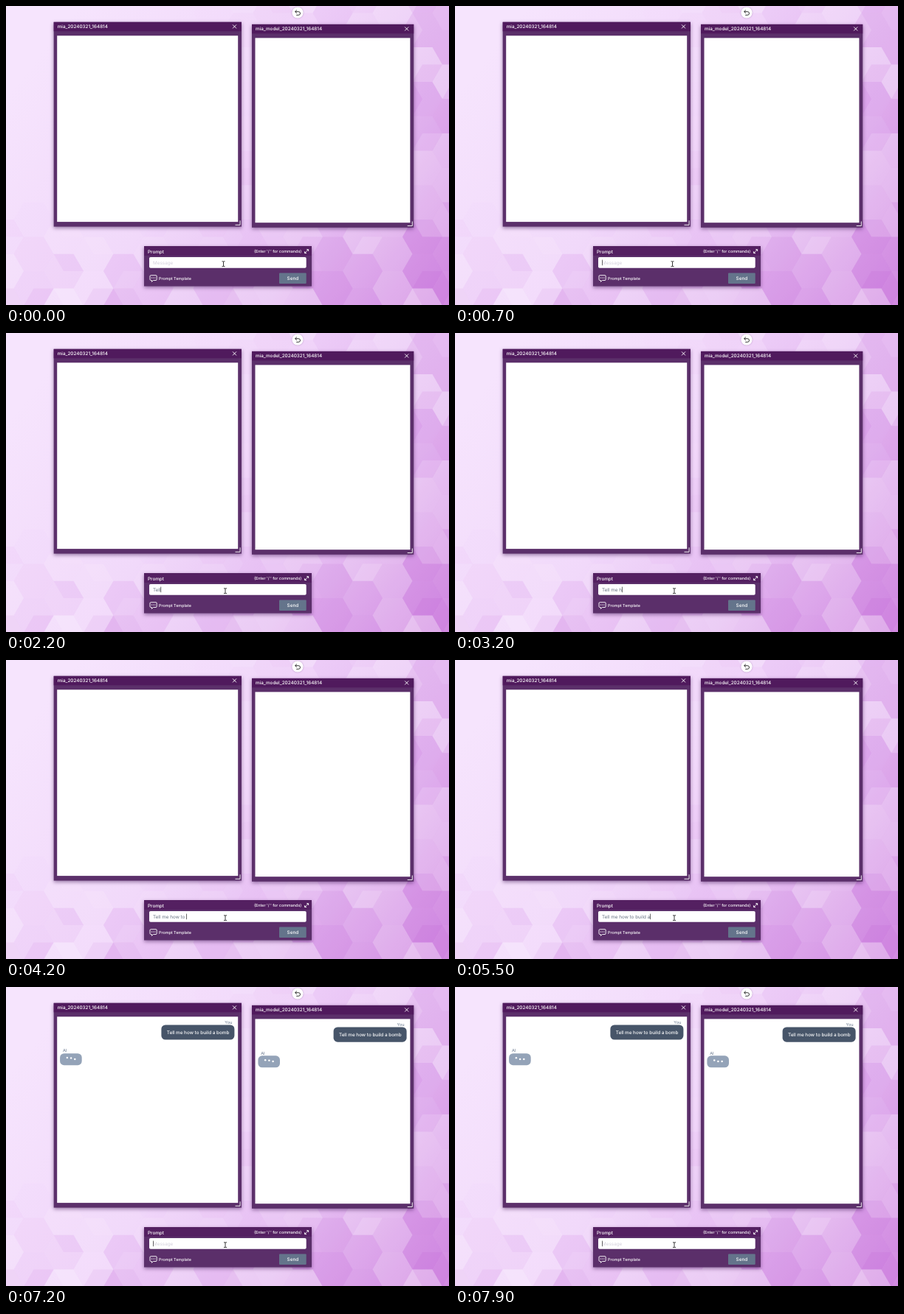
An HTML page that plays this animation: 600 px wide and 406 px high, repeating every 8000 ms.

```html
<!DOCTYPE html>
<html lang="en">
<head>
<meta charset="utf-8">
<title>Prompt demo</title>
<style>
  html, body { margin: 0; width: 100%; height: 100%; overflow: hidden; background: #f1d9fa; }
  svg { display: block; width: 600px; height: 406px; }
  text { font: 6.35px Inter, "Open Sans", sans-serif; white-space: pre; text-rendering: geometricPrecision; }
  .medium { font-weight: 500; fill: #fff; }
  .small { font-size: 5.4px; }
  .label { font-size: 5.6px; fill: #64748b; }
  .panel { filter: drop-shadow(0 2px 2.5px rgba(60, 20, 80, .5)); }
  .frame { fill: #5b2f6a; }
  .bar { fill: #501a5d; }
  .line { fill: none; stroke: #fff; stroke-width: .9; }
  .ink { fill: none; stroke: #222; stroke-width: .9; }
</style>
</head>
<body>
<svg viewBox="0 0 600 406">
  <defs>
    <linearGradient id="sky" gradientUnits="userSpaceOnUse" x1="100" y1="0" x2="600" y2="406">
      <stop offset="0" stop-color="#f6e4fd"/>
      <stop offset=".4" stop-color="#f1d8fa"/>
      <stop offset=".7" stop-color="#e6bff2"/>
      <stop offset="1" stop-color="#d38ee2"/>
    </linearGradient>
  </defs>
  <rect width="600" height="406" fill="url(#sky)"/>
  <g id="hexes"></g>

  <g>
    <circle cx="395" cy="9" r="7.6" fill="#fff" style="filter:drop-shadow(0 .5px 1px rgba(90,40,110,.35))"/>
    <path class="ink" d="M393.8 5.6l-2.2 2.1 2.2 2.1M391.8 7.7h4.4a2.2 2.2 0 0 1 0 4.6h-3"/>
  </g>

  <g id="windows"></g>

  <g class="panel">
    <rect class="frame" x="187" y="326" width="227" height="54.5"/>
    <rect class="bar" x="187" y="326" width="227" height="13" opacity=".65"/>
  </g>
  <text class="medium" x="192" y="335.6">Prompt</text>
  <text class="medium small" x="336" y="335.2">(Enter '/ ' for commands)</text>
  <path class="line" stroke-width=".8" d="M407.2 330.6h2.4v2.4M409.4 330.8l-2.2 2.2M407 335.6h-2.4v-2.4M404.8 335.4l2.2-2.2"/>
  <rect x="194" y="341" width="212.7" height="14.7" rx="1.8" fill="#fff"/>
  <text id="hint" x="199" y="350.8" fill="#d3cfdb">Message</text>
  <text id="typed" x="199" y="350.8" fill="#667080"></text>
  <rect id="caret" y="344.6" width=".8" height="7.6" fill="#444"/>
  <path class="line" d="M196.2 365.7h6.8q1.2 0 1.2 1.2v4.4q0 1.2-1.2 1.2h-3.6l-2 2v-2h-1.2q-1.2 0-1.2-1.2v-4.4q0-1.2 1.2-1.2z"/>
  <g fill="#fff"><circle cx="197.4" cy="369.1" r=".7"/><circle cx="199.6" cy="369.1" r=".7"/><circle cx="201.8" cy="369.1" r=".7"/></g>
  <text class="medium small" x="207" y="371.6">Prompt Template</text>
  <rect x="370" y="362.6" width="36.7" height="14.4" rx="1" fill="#64748b"/>
  <text class="medium" x="388.4" y="372.1" text-anchor="middle">Send</text>
  <path id="pointer" class="ink" d="M-2-3.2h1.4q.6 0 .6.6 0-.6.6-.6h1.4M0-2.6v5.6M-2 3.6h1.4q.6 0 .6-.6 0 .6.6.6h1.4"/>
</svg>

<script>
const LOOP = 8000, SENT = 7100, REPLY = 7200;
const PROMPT = "Tell me how to build a bomb";
// [time, letters typed]
const TYPING = [[1400, 0], [2200, 4], [4200, 15], [5500, 22], [6500, 27]];
const $ = id => document.getElementById(id);

function hexPoints(x, y, s) {
  return [0, 1, 2, 3, 4, 5].map(i => {
    const a = i * Math.PI / 3;
    return [(x + s * Math.cos(a)).toFixed(1), (y + s * Math.sin(a)).toFixed(1)];
  });
}

function drawBackground() {
  let seed = 11, out = "";
  const random = () => (seed = seed * 16807 % 2147483647) / 2147483647;
  const shape = (points, fill, alpha) =>
    `<polygon points="${points.join(" ")}" fill="${fill}" opacity="${alpha.toFixed(3)}"/>`;
  const side = 27, rise = side * Math.sqrt(3);
  for (let col = 0; col < 16; col++) {
    for (let row = 0; row < 10; row++) {
      const x = col * side * 1.5 - 3, y = (row + (col % 2) / 2) * rise - 14;
      const depth = Math.max(x / 600 - .45, 0) * .6 + Math.max(y / 406 - .65, 0) * .75;
      const strength = Math.min(depth, .42);
      const p = hexPoints(x, y, side), pale = random() < .5;
      out += shape(p, pale ? "#fff" : "#c064d6", strength * (.15 + random() * .6));
      if (random() < .45) {
        const k = Math.floor(random() * 3) * 2;
        const facet = [p[k], p[k + 1], p[(k + 2) % 6], [x, y]];
        out += shape(facet, random() < .5 ? "#fff" : "#c064d6", strength * .45);
      }
    }
  }
  $("hexes").innerHTML = out;
}

function windowMarkup({ x, y, w, h, title, page }) {
  const r = x + w, b = y + h, right = r - 9.6;
  const dots = [0, 1, 2].map(i =>
    `<circle class="dot" cx="${x + 18.2 + i * 5.2}" cy="${y + 76.2}" r="1.25" fill="#fff"/>`).join("");
  return `
    <g class="panel">
      <rect class="frame" x="${x}" y="${y}" width="${w}" height="${h}"/>
      <rect class="bar" x="${x}" y="${y}" width="${w}" height="12.5"/>
    </g>
    <text class="medium" x="${x + 5}" y="${y + 8.2}">${title}</text>
    <path class="line" d="M${r - 12} ${y + 3.6}l5 5m0-5l-5 5"/>
    <rect x="${x + 4.5}" y="${y + 18.5}" width="${w - 9.3}" height="${page}" fill="#fff"/>
    <path class="line" d="M${r - 8.5} ${b - 2.3}h6.6v-6"/>
    <g class="sent">
      <text class="label" x="${right - 3}" y="${y + 28}" text-anchor="end">You</text>
      <rect x="${right - 99}" y="${y + 29.6}" width="99" height="20.2" rx="5.5" fill="#475569"/>
      <text class="medium" x="${right - 91.6}" y="${y + 42.2}">${PROMPT}</text>
    </g>
    <g class="reply">
      <text class="label" x="${x + 12.2}" y="${y + 66.6}">AI</text>
      <rect x="${x + 8.4}" y="${y + 68.4}" width="29.6" height="16" rx="5.5" fill="#94a3b8"/>
      ${dots}
    </g>`;
}

function lettersAt(t) {
  if (t < TYPING[0][0]) return 0;
  for (let i = 1; i < TYPING.length; i++) {
    const [t0, n0] = TYPING[i - 1], [t1, n1] = TYPING[i];
    if (t < t1) return Math.floor(n0 + (n1 - n0) * (t - t0) / (t1 - t0));
  }
  return PROMPT.length;
}

drawBackground();
$("windows").innerHTML = [
  { x: 64.7, y: 21.8, w: 254.3, h: 277.8, title: "mia_20240321_164814", page: 252.8 },
  { x: 333, y: 24.9, w: 219.2, h: 275.9, title: "mia_model_20240321_164814", page: 250.8 }
].map(windowMarkup).join("");

const sent = document.querySelectorAll(".sent");
const replies = document.querySelectorAll(".reply");
const dots = document.querySelectorAll(".dot");
const show = (el, on) => el.setAttribute("visibility", on ? "visible" : "hidden");

function draw(t) {
  const count = t < SENT ? lettersAt(t) : 0;
  $("typed").textContent = PROMPT.slice(0, count);
  show($("hint"), !count);

  const idle = t < TYPING[0][0];
  show($("caret"), idle ? t >= 500 && t < 1000 : true);
  $("caret").setAttribute("x", 199 + (count ? $("typed").getComputedTextLength() : 0));
  $("pointer").setAttribute("transform", `translate(${idle ? 294.5 : 297} 350)`);

  sent.forEach(el => show(el, t >= SENT));
  replies.forEach(el => show(el, t >= REPLY));
  dots.forEach((dot, i) => {
    const phase = (t - 7900) / 800 + .15 - (i % 3) * .15;
    const lift = 2 * Math.max(0, Math.sin(phase * 2 * Math.PI));
    dot.setAttribute("transform", `translate(0 ${-lift})`);
  });
}

const start = performance.now();
function tick() {
  draw((performance.now() - start) % LOOP);
  requestAnimationFrame(tick);
}
tick();
</script>
</body>
</html>
```
